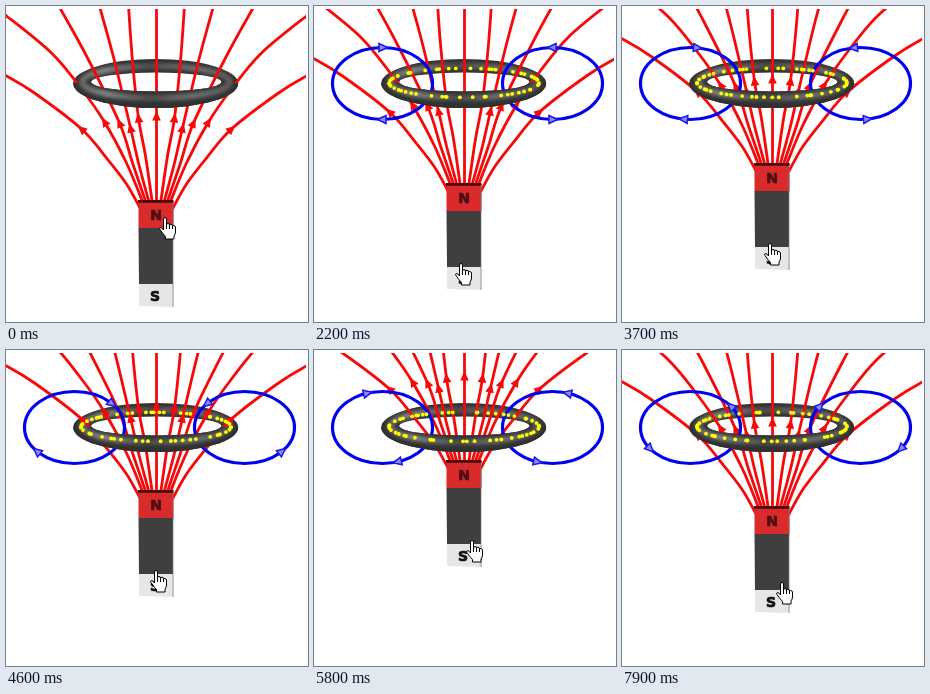
An HTML page that plays this animation: 302x316 px, repeating every 8 s.

```html
<!DOCTYPE html>
<html lang="en">
<head>
<meta charset="utf-8">
<title>Magnet and ring</title>
<style>
  html, body { margin: 0; width: 100%; height: 100%; overflow: hidden; background: #fff; }
  svg { display: block; width: 100vw; height: 100vh; }
  text { font: bold 14px "DejaVu Sans", "Liberation Sans", sans-serif; text-anchor: middle; stroke-width: .7; }
</style>
</head>
<body>
<svg viewBox="0 0 302 316">
  <defs>
    <clipPath id="stage"><rect y="3" width="300" height="313"/></clipPath>
    <clipPath id="near"><rect y="77" width="302" height="40"/></clipPath>
    <clipPath id="tube"><path id="tubeShape" clip-rule="evenodd"/></clipPath>
    <filter id="soft" x="-20%" y="-60%" width="140%" height="220%"><feGaussianBlur stdDeviation="2.2"/></filter>
    <linearGradient id="steel">
      <stop offset="0" stop-color="#777"/><stop offset=".16" stop-color="#999"/>
      <stop offset=".45" stop-color="#555"/><stop offset=".75" stop-color="#808080"/>
      <stop offset="1" stop-color="#666"/>
    </linearGradient>
    <g id="ring" clip-path="url(#tube)">
      <rect x="60" y="48" width="180" height="60" fill="#303030"/>
      <ellipse cx="150" cy="76" rx="74" ry="16" fill="none" stroke="url(#steel)" stroke-width="5" filter="url(#soft)"/>
    </g>
  </defs>
  <use href="#ring"/>
  <g clip-path="url(#stage)"><g id="field" fill="#f80808"></g></g>
  <g id="loops"></g>
  <g id="magnet">
    <path d="M132.5 195H167.5V222.5H132.5Z" fill="#d92b2b"/>
    <path d="M132 194H167.5V196.8H132Z" fill="#4a0808"/>
    <path d="M132.5 222H167V278H133Z" fill="#3f3f3f"/>
    <path d="M133 278H167.5V301L133 300Z" fill="#e6e6e6"/>
    <path d="M167 196V301" stroke="#777" stroke-width=".7"/>
    <text x="150" y="214.3" fill="#4c1010" stroke="#4c1010">N</text>
    <text x="149" y="295" fill="#111" stroke="#111">S</text>
  </g>
  <g clip-path="url(#near)"><use href="#ring"/></g>
  <g id="charges" fill="#ff0"></g>
  <g id="hand" stroke="#000" stroke-linejoin="round">
    <path fill="#fff" d="M4.5 13V2Q4.5 .5 6 .5T7.5 2V8Q7.5 6.5 9 6.5T10.5 8Q10.5 7.2 12 7.2T13.5 9Q14 8.3 15 8.5T16.5 10V15Q16.5 17 15 19V22H6.5V19.5Q4 17 1 12.5Q0 10.5 1.5 10.5Q3 10.5 4.5 13Z"/>
    <path fill="none" d="M7.5 8V12M10.5 8V12M13.5 9V12"/>
  </g>
</svg>
<script>
const $ = id => document.getElementById(id);
const rad = Math.PI / 180;

function add(parent, tag, attrs) {
  const node = document.createElementNS("http://www.w3.org/2000/svg", tag);
  for (const name in attrs) node.setAttribute(name, attrs[name]);
  return parent.appendChild(node);
}

const oval = (x, y, rx, ry) =>
  `M${x - rx} ${y}a${rx} ${ry} 0 1 0 ${2 * rx} 0a${rx} ${ry} 0 1 0 ${-2 * rx} 0Z`;

$("tubeShape").setAttribute("d", oval(149.7, 77.5, 82.5, 24.5) + oval(150.3, 76, 65, 9.5));

// Smooth curve through the given points
function curve(points) {
  const at = i => points[Math.max(0, Math.min(points.length - 1, i))];
  let d = "M" + points[0];
  for (let i = 0; i < points.length - 1; i++) {
    const [a, b, c, e] = [at(i - 1), at(i), at(i + 1), at(i + 2)];
    const c1 = b.map((v, k) => v + (c[k] - a[k]) / 6);
    const c2 = c.map((v, k) => v - (e[k] - b[k]) / 6);
    d += `C${c1} ${c2} ${c}`;
  }
  return d;
}

// Half of the field: distance from the axis and height, arrowhead at the given point
const fieldLines = [
  { head: 3, pts: [[16, 203], [30, 178], [50, 152], [75, 123], [122, 87], [150, 70], [180, 55]] },
  { head: 2, pts: [[13, 198], [30, 157], [52, 116], [75, 83], [105, 47], [150, 10], [165, 0]] },
  { head: 2, pts: [[10, 198], [24, 157], [37, 117], [70, 50], [96, 3], [104, -10]] },
  { head: 2, pts: [[7, 198], [18, 157], [26, 122], [42, 55], [57, 0]] },
  { head: 2, pts: [[4, 198], [11, 150], [18, 112], [24, 55], [28, 0]] },
  { head: 1, pts: [[0, 198], [0, 110], [0, 0]] }
];
for (const { head, pts } of fieldLines) {
  for (const side of pts[0][0] ? [-1, 1] : [1]) {
    const line = pts.map(([x, y]) => [150.5 + side * x, y]);
    add($("field"), "path", { d: curve(line), fill: "none", stroke: "#f80808", "stroke-width": 2.8 });
    const [p, q] = [line[head - 1], line[head + 1]];
    const angle = Math.atan2(q[1] - p[1], q[0] - p[0]) / rad;
    add($("field"), "path", { d: "M5 0L-4.5 4.3V-4.3Z", transform: `translate(${line[head]}) rotate(${angle})` });
  }
}

// Induced field loops, the right one mirrored
const loopArrows = [];
for (const flip of ["", "translate(307) scale(-1 1)"]) {
  const loop = add($("loops"), "g", { transform: flip });
  add(loop, "ellipse", { cx: 68.5, cy: 77.5, rx: 50, ry: 36, fill: "none", stroke: "#0000f0", "stroke-width": 3.2 });
  for (const turn of [0, 180]) {
    const node = add(loop, "path", { d: "M5 0L-3.5 4V-4Z", fill: "#8c8cff", stroke: "#1818e8", "stroke-width": 1.5 });
    loopArrows.push({ node, turn });
  }
}

let seed = 11;
const random = () => (seed = seed * 16807 % 2147483647) / 2147483647;
const charges = Array.from({ length: 52 }, (_, i) => ({
  angle: i * 360 / 52 + random() * 14,
  node: add($("charges"), "circle", { r: 1.9 })
}));

// Keys are [step, value], one step is 100 ms
const lift = [[17, 0], [22, -17], [26, -24], [35, -34], [44, -49], [53, -70], [58, -84], [62, -96], [70, -96], [73, -79], [79, -38]];
const handX = [[0, 152.5], [8, 141], [37, 141.5], [46, 144], [58, 152], [65, 153.5]];
const handY = [[0, 211], [8, 270], [9, 270], [12, 274], [62, 274], [65, 270]];

function tween(keys, step) {
  if (step <= keys[0][0]) return keys[0][1];
  for (let i = 1; i < keys.length; i++) {
    const [a, from] = keys[i - 1], [b, to] = keys[i];
    if (step <= b) return from + (to - from) * (step - a) / (b - a);
  }
  return keys[keys.length - 1][1];
}

function draw(step) {
  const rise = tween(lift, step);
  const rising = step >= 18 && step <= 62;
  const falling = step >= 71;
  const display = rising || falling ? "inline" : "none";
  const move = `translate(0 ${Math.round(rise)})`;
  $("field").setAttribute("transform", move);
  $("magnet").setAttribute("transform", move);
  $("hand").setAttribute("transform",
    `translate(${Math.round(tween(handX, step))} ${Math.round(tween(handY, step) + rise)})`);
  $("loops").style.display = $("charges").style.display = display;

  const phase = falling ? 21 - 24.4 * (step - 73) : 24.5 * (step - 22);
  for (const { node, turn } of loopArrows) {
    const a = (phase + turn) * rad, sin = Math.sin(a), cos = Math.cos(a);
    const heading = Math.atan2(36 * sin, 50 * cos) / rad + (falling ? 180 : 0);
    node.setAttribute("transform", `translate(${68.5 + 50 * sin} ${77.5 - 36 * cos}) rotate(${heading})`);
  }

  const drift = falling ? 3 * (step - 71) : -3 * (step - 18);
  for (const { node, angle } of charges) {
    const a = (angle + drift) * rad;
    node.setAttribute("cx", 150 + 75 * Math.cos(a));
    node.setAttribute("cy", 76.8 + 14.5 * Math.sin(a));
  }
}

const start = performance.now();
function tick(now) {
  draw(Math.floor(Math.max(0, now - start) / 100) % 80);
  requestAnimationFrame(tick);
}
draw(0);
requestAnimationFrame(tick);
</script>
</body>
</html>
```
